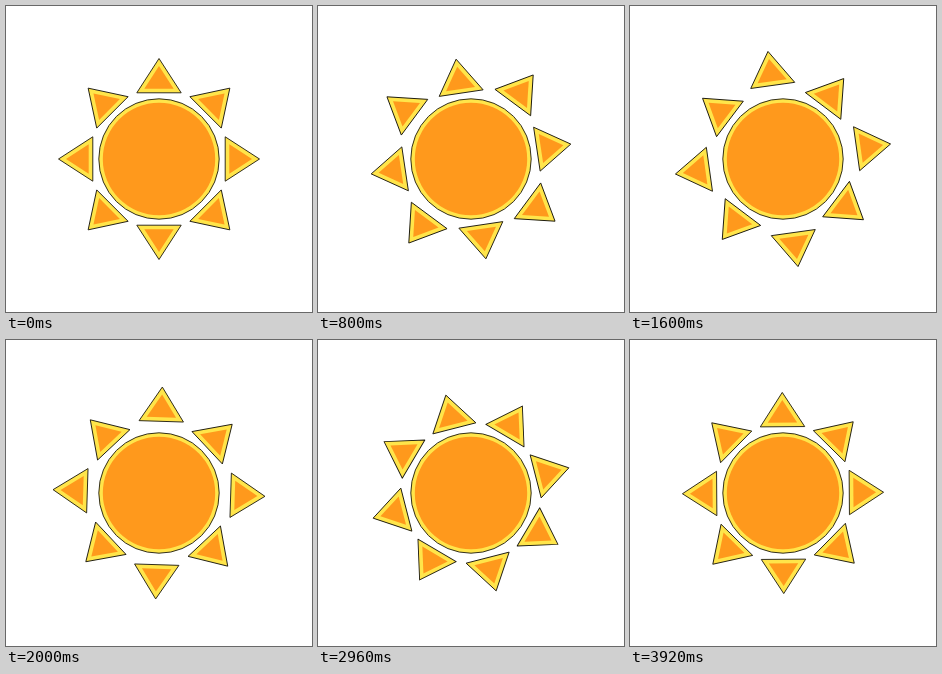
An HTML page with a canvas that plays this animation: 306 px wide and 306 px high, repeating every 4000 ms.

```html
<!DOCTYPE html>
<html lang="en">
<head>
<meta charset="utf-8">
<title>Spinning sun</title>
<style>
  html, body { margin: 0; width: 100%; height: 100%; overflow: hidden; background: #fff; }
  canvas { display: block; }
</style>
</head>
<body>
<canvas id="stage" width="306" height="306"></canvas>
<script>
const ctx = document.getElementById('stage').getContext('2d');
const LOOP = 4000, STEP = 80, CENTER = 153, RADIUS = 60.2;
const ORANGE = '#ff991c', YELLOW = '#ffe54a', INK = '#1c1a10';

// Ray geometry: height, half base, inradius
const HEIGHT = 34.3, HALF = 22.2, INRADIUS = 12.1, BORDER = 4.1;

// Key points as [step, value]; tip distances for alternate rays
const tips = [
  [[0, 100.5], [7.5, 106], [16.7, 98], [25, 106], [33.3, 98.2], [41.7, 105], [50, 100.4]],
  [[0, 100.2], [7.5, 98], [16, 112], [29, 97], [34, 103.4], [42, 96], [50, 100.2]]
];
const sway = [[0, 0], [5, 0], [14, -1.6], [25, 1.8], [33, 1.6], [42, 0], [50, 0]];

const smooth = x => x * x * (3 - 2 * x);

function track(keys, step) {
  const i = keys.findIndex(key => key[0] > step);
  const [s0, v0] = keys[i - 1], [s1, v1] = keys[i];
  return v0 + (v1 - v0) * smooth((step - s0) / (s1 - s0));
}

function fillPath(color) {
  ctx.fillStyle = color;
  ctx.fill();
}

function outline() {
  ctx.strokeStyle = INK;
  ctx.lineWidth = 0.9;
  ctx.lineJoin = 'round';
  ctx.stroke();
}

// Triangle pointing up, scaled about its incentre
function triangle(tip, scale) {
  const base = tip - HEIGHT, mid = base + INRADIUS;
  const y = r => -(mid + (r - mid) * scale);
  ctx.beginPath();
  ctx.moveTo(0, y(tip));
  ctx.lineTo(HALF * scale, y(base));
  ctx.lineTo(-HALF * scale, y(base));
  ctx.closePath();
}

function ray(tip, angle) {
  ctx.save();
  ctx.rotate(angle * Math.PI / 180);
  triangle(tip, 1);
  fillPath(YELLOW);
  outline();
  triangle(tip, 1 - BORDER / INRADIUS);
  fillPath(ORANGE);
  ctx.restore();
}

function disc(radius, color) {
  ctx.beginPath();
  ctx.arc(0, 0, radius, 0, 2 * Math.PI);
  fillPath(color);
}

function draw(now) {
  const step = Math.floor(now % LOOP / STEP);
  const turn = 360 * smooth(step * STEP / LOOP) + track(sway, step);
  ctx.setTransform(1, 0, 0, 1, 0, 0);
  ctx.fillStyle = '#fff';
  ctx.fillRect(0, 0, 306, 306);
  ctx.translate(CENTER, CENTER);
  disc(RADIUS, YELLOW);
  outline();
  disc(RADIUS - 4, ORANGE);
  for (let i = 0; i < 8; i++) ray(track(tips[i % 2], step), turn + i * 45);
}

const start = performance.now();
function tick() {
  draw(performance.now() - start);
  requestAnimationFrame(tick);
}
tick();
</script>
</body>
</html>
```
